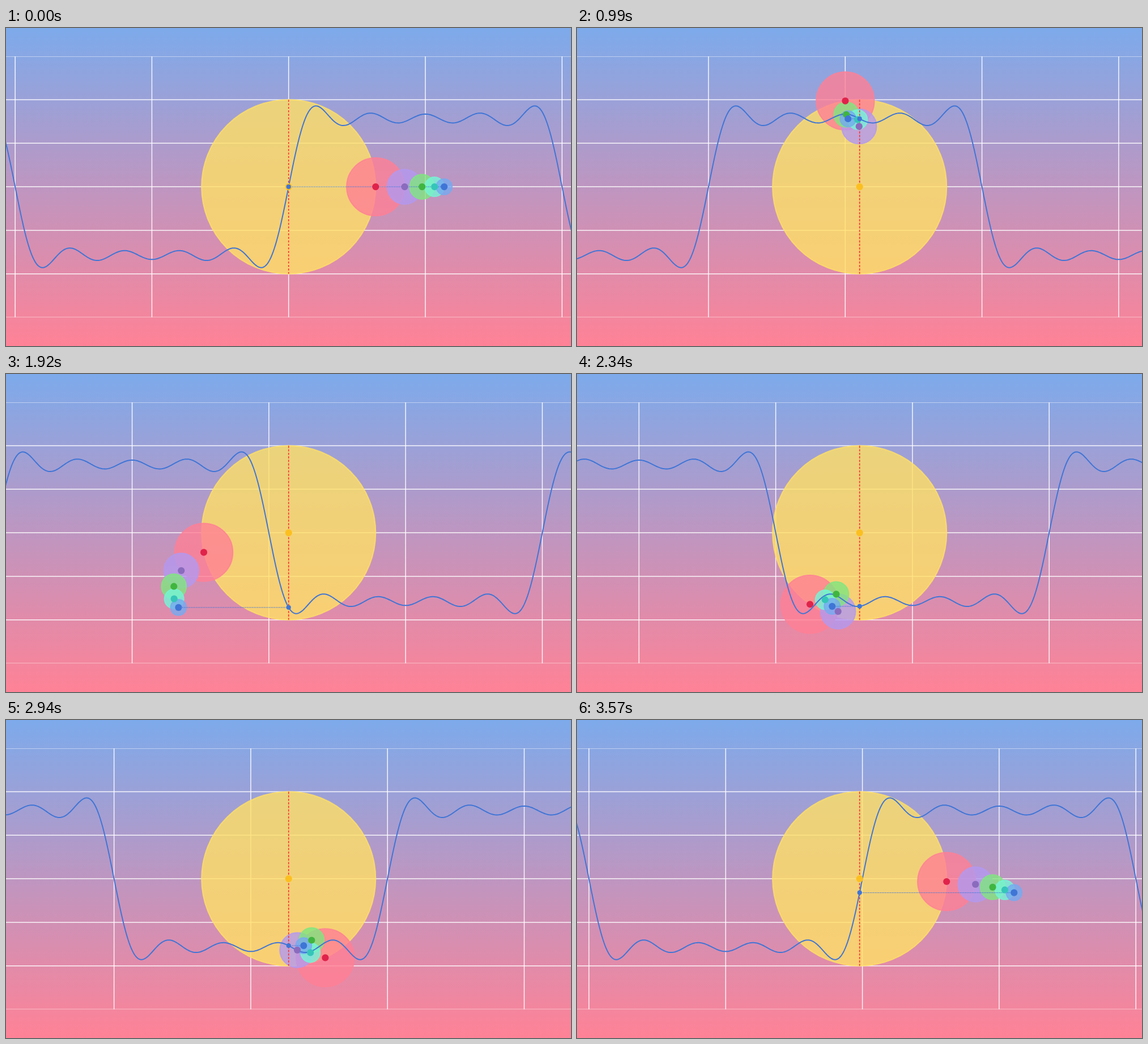
Write an HTML page that moves like this. It is 997 px wide and 561 px high and loops after 3.6 s.

```html
<!DOCTYPE html>
<html lang="en">
<head>
<meta charset="utf-8">
<title>Square wave epicycles</title>
<style>
  html, body { margin: 0; width: 100%; height: 100%; overflow: hidden; }
  body { background: linear-gradient(#7daaeb, #ff8296); }
  svg { display: block; width: 997px; height: 561px; }
</style>
</head>
<body>
<svg viewBox="0 0 997 561">
  <defs><clipPath id="view"><rect y="50" width="997" height="460.3"/></clipPath></defs>
  <g id="stage" clip-path="url(#view)"></g>
</svg>
<script>
const R = 153.6, CX = 498.7, CY = 280.1;
const TAU = 2 * Math.PI, PERIOD = TAU * R;
const LOOP = 3600, STEP = 30;
const ORDERS = [1, 3, 5, 7, 9, 11];
const TERMS = ORDERS.slice(0, 5);
const LIGHT = ['#ffe066', '#ff8095', '#b399f0', '#80e680', '#75f5d8', '#75aaf0'];
const DARK = ['#fcbf20', '#e0234a', '#8a6bbd', '#40b53f', '#35c5b9', '#3f75d6'];
const BLUE = '#3f75d6';

// Slightly uneven rotation speed: [ms, turns]
const PACE = [[0, 0], [510, .1408], [990, .2763], [1530, .4272],
              [2340, .6534], [2940, .8192], [3570, .9949], [3600, 1]];

const stage = document.getElementById('stage');

function set(el, attrs) {
  for (const k in attrs) el.setAttribute(k, attrs[k]);
  return el;
}

function add(tag, attrs, parent = stage) {
  const el = document.createElementNS('http://www.w3.org/2000/svg', tag);
  return parent.appendChild(set(el, attrs));
}

function wave(a) {
  return TERMS.reduce((sum, n) => sum + Math.sin(n * a) / n, 0);
}

function wavePath() {
  const pts = [];
  for (let x = -PERIOD; x <= 2 * PERIOD; x += 2) {
    pts.push(x.toFixed(2) + ' ' + (CY - R * wave(x / R)).toFixed(2));
  }
  return 'M' + pts.join('L');
}

const white = { stroke: '#fff', 'stroke-width': 1.5, 'stroke-opacity': .9 };
for (let i = -3; i <= 3; i++) {
  const y = CY + i * R / 2;
  add('line', { x1: 0, x2: 997, y1: y, y2: y, ...white });
}
const columns = add('g', white);
for (let i = -4; i <= 8; i++) {
  const x = i * PERIOD / 4;
  add('line', { x1: x, x2: x, y1: 0, y2: 561 }, columns);
}

const discs = ORDERS.map((n, i) => add('circle', {
  r: R / n, fill: LIGHT[i], stroke: LIGHT[i], 'stroke-width': 2,
  'fill-opacity': .8, 'stroke-opacity': .8
}));
const axis = add('line', {
  x1: CX, x2: CX, y1: CY - R, y2: CY + R,
  stroke: '#ff3030', 'stroke-width': 1.6, 'stroke-dasharray': '3.9 2.3'
});
const curve = add('path', { d: wavePath(), fill: 'none', stroke: BLUE, 'stroke-width': 2 });
const link = add('line', {
  x1: CX, stroke: BLUE, 'stroke-width': 1.2, 'stroke-dasharray': '1.5 1.5'
});
const dots = DARK.map(fill => add('circle', { r: 6.1, fill }));
const marker = add('circle', { cx: CX, r: 4.1, fill: BLUE });

function turns(t) {
  const i = PACE.findIndex(p => p[0] > t);
  const [t0, v0] = PACE[i - 1], [t1, v1] = PACE[i];
  return v0 + (v1 - v0) * (t - t0) / (t1 - t0);
}

function draw(ms) {
  const t = Math.floor((ms % LOOP) / STEP) * STEP;
  const a = turns(t) * TAU;
  let x = CX, y = CY;
  ORDERS.forEach((n, i) => {
    set(discs[i], { cx: x, cy: y });
    set(dots[i], { cx: x, cy: y });
    if (i < TERMS.length) {
      x += R / n * Math.cos(n * a);
      y -= R / n * Math.sin(n * a);
    }
  });
  set(link, { x2: x, y1: y, y2: y });
  set(marker, { cy: y });
  const shift = `translate(${CX - a * R} 0)`;
  set(columns, { transform: shift });
  set(curve, { transform: shift });
}

const start = performance.now();
function tick() {
  draw(performance.now() - start);
  requestAnimationFrame(tick);
}
tick();
</script>
</body>
</html>
```
